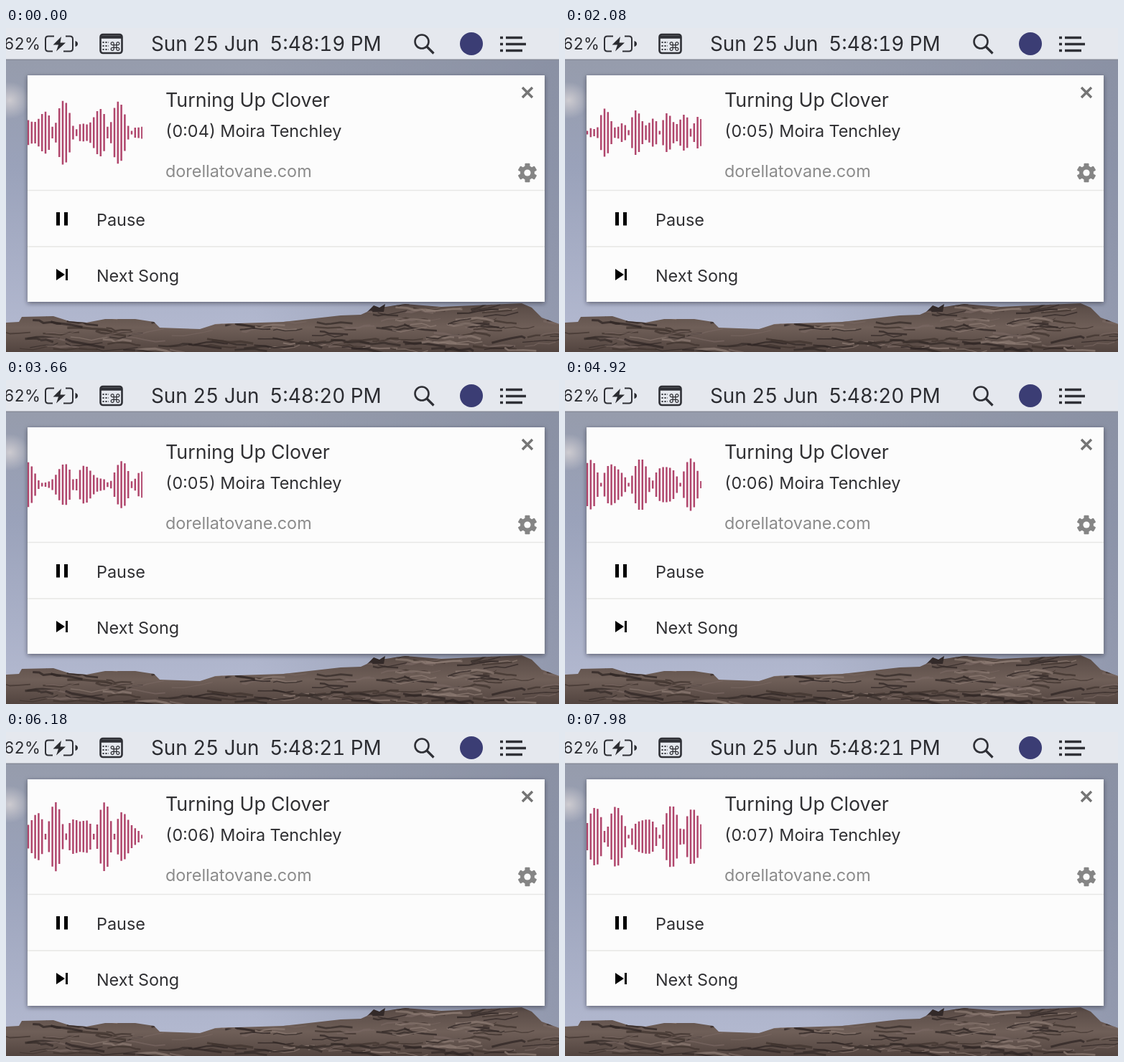
These frames come from a looping animation (770x452 px, 8 s). An HTML page:

```html
<!DOCTYPE html>
<html lang="en">
<head>
<meta charset="utf-8">
<title>Music notification</title>
<style>
  html, body { margin: 0; width: 100%; height: 100%; overflow: hidden; background: #9aa0b4; }
  svg { display: block; width: 770px; height: 452px; }
  text { font-family: Inter, Roboto, sans-serif; white-space: pre; font-variant-numeric: tabular-nums; }
  .menu { fill: #2b2c31; }
  .row { fill: #303033; font-size: 23.4px; }
  .line { fill: none; stroke: #2f3036; }
</style>
</head>
<body>
<svg viewBox="0 0 770 452">
  <defs>
    <linearGradient id="sky" x1="0" y1="44" x2="0" y2="420" gradientUnits="userSpaceOnUse">
      <stop offset="0" stop-color="#969cac"/>
      <stop offset=".4" stop-color="#9aa2ba"/>
      <stop offset="1" stop-color="#b2b8cf"/>
    </linearGradient>
    <linearGradient id="dusk">
      <stop offset=".45" stop-color="#858ca0" stop-opacity="0"/>
      <stop offset="1" stop-color="#858ca0" stop-opacity=".7"/>
    </linearGradient>
    <radialGradient id="glow">
      <stop offset="0" stop-color="#cdcbd0"/>
      <stop offset="1" stop-color="#cdcbd0" stop-opacity="0"/>
    </radialGradient>
    <linearGradient id="rock" x1="0" y1="0" x2="0" y2="1">
      <stop offset="0" stop-color="#584a45"/>
      <stop offset=".5" stop-color="#6f5f58"/>
      <stop offset="1" stop-color="#52443f"/>
    </linearGradient>
    <filter id="shade" x="-5%" y="-5%" width="110%" height="112%">
      <feDropShadow dx="0" dy="2" stdDeviation="3" flood-color="#20222c" flood-opacity=".55"/>
    </filter>
    <clipPath id="cover"><rect x="30" y="66" width="160" height="160"/></clipPath>
    <path id="cliff" d="M0 411L18 410 22 403 66 402 88 409 112 411 138 406 180 406 206 410 214 418 270 420 292 413 386 410 466 401 494 400 514 391 556 385 606 389 718 384 732 390 746 404 770 413V452H0Z"/>
    <clipPath id="stone"><use href="#cliff"/></clipPath>
  </defs>

  <rect y="44" width="770" height="408" fill="url(#sky)"/>
  <rect y="44" width="770" height="408" fill="url(#dusk)"/>
  <ellipse cx="5" cy="101" rx="28" ry="26" fill="url(#glow)"/>
  <use href="#cliff" fill="url(#rock)"/>
  <path d="M503 396L512 387 520 390 528 385 526 396Z" fill="#332a29"/>
  <g id="cracks" clip-path="url(#stone)" fill="none" stroke-linejoin="round"></g>

  <rect width="770" height="44" fill="#e5e8ee"/>
  <rect y="43.5" width="770" height="1.5" fill="#868b98"/>

  <text class="menu" x="-3" y="30" font-size="22.3">62%</text>
  <g class="line" stroke-width="2">
    <path d="M67 11.5H59Q55 11.5 55 15.5V28.5Q55 32.5 59 32.5H65M83 11.5H89Q93 11.5 93 15.5V28.5Q93 32.5 89 32.5H80"/>
    <rect x="131.5" y="9" width="30" height="26" rx="3.5" stroke-width="2.6"/>
    <path d="M131 12.5H162" stroke-width="4.5"/>
    <path d="M134.5 20H143M134.5 25H143M134.5 30H143" stroke-dasharray="2 2"/>
    <circle cx="579" cy="19" r="9.5" stroke-width="2.6"/>
    <path d="M586 26L595.5 35.5" stroke-width="3.2"/>
    <path d="M688 13.5H692M696 13.5H719M688 22.5H692M696 22.5H724M688 31.5H692M696 31.5H719" stroke-width="3.6"/>
  </g>
  <path class="menu" d="M77 12L65.500 23.500H73L70 32.500 83 20.500H75.500ZM96.500 18Q100 19 100 22T96.500 26Z"/>
  <text class="menu" x="143.500" y="32" font-size="17" style="font-family:'DejaVu Sans',sans-serif">⌘</text>
  <text class="menu" id="clock" x="202" y="32" font-size="27.800"></text>
  <circle cx="648" cy="22" r="16" fill="#3b3d74"/>

  <rect x="30" y="66" width="720" height="316" fill="#fcfcfc" filter="url(#shade)"/>
  <path d="M30 226.500H750M30 305H750" stroke="#e7e7e5" stroke-width="1.500"/>
  <path id="wave" clip-path="url(#cover)" fill="none" stroke="#b0466c" stroke-width="2.500"/>

  <text x="222" y="110" font-size="26.800" fill="#303033">Turning Up Clover</text>
  <text class="row" id="song" x="222" y="152"></text>
  <text class="row" x="222" y="208" style="fill:#8b8b8b">dorellatovane.com</text>
  <text class="row" x="126" y="276">Pause</text>
  <text class="row" x="126" y="354">Next Song</text>

  <path d="M719 83L733 97M733 83L719 97" stroke="#747474" stroke-width="3.400"/>
  <g id="gear" transform="translate(726 202)" fill="#858585">
    <circle r="10"/>
    <circle r="4.600" fill="#fcfcfc"/>
  </g>
  <path d="M70 257H75V275.500H70ZM81 257H86V275.500H81ZM70 336L82 344 70 352ZM83 336H86V352H83Z"/>
</svg>
<script>
const LOOP = 8000, TICK = 140, SECOND = 2800, BARS = 34;
const $ = id => document.getElementById(id);

function random(seed) {
  const v = Math.sin(seed * 127.1 + 11.7) * 43758.5453;
  return v - Math.floor(v);
}

// Two rectified sine waves with seeded loudness, pitch and phase
function level(tick, bar) {
  const r = k => random(tick * 7 + k);
  const low = (20 + 16 * r(1)) * Math.sin(bar * (0.3 + 0.16 * r(2)) + 6.28 * r(3));
  const high = (6 + 9 * r(4)) * Math.sin(bar * (0.7 + 0.4 * r(5)) + 6.28 * r(6));
  return Math.max(2.5, Math.abs(low + high));
}

function wavePath(tick) {
  let d = '';
  for (let i = 0; i < BARS; i++) {
    const h = level(tick, i);
    d += `M${(31 + 4.8 * i).toFixed(1)} ${(146 - h).toFixed(1)}v${(2 * h).toFixed(1)}`;
  }
  return d;
}

// Jagged, mostly level seams in dark and light stone
function buildRock() {
  const tones = ['#2f2625', '#40342f', '#8b7a72', '#352b29', '#776660'];
  let seams = '';
  for (let i = 0; i < 170; i++) {
    const r = k => random(i * 9 + k + 500);
    let d = `M${(780 * r(0) - 10).toFixed(1)} ${(386 + 64 * r(1)).toFixed(1)}`;
    for (let k = 2; k < 6; k++)
      d += `l${(5 + 13 * r(k)).toFixed(1)} ${(7 * r(k + 3) - 3.5).toFixed(1)}`;
    seams += `<path d="${d}" stroke="${tones[i % tones.length]}" stroke-width="${(1 + 2.4 * r(8)).toFixed(1)}" opacity=".75"/>`;
  }
  $('cracks').innerHTML = seams;
}

function buildGear() {
  let teeth = '';
  for (let a = 0; a < 360; a += 60)
    teeth += `<rect x="-3.5" y="-13.3" width="7" height="6" rx="1" transform="rotate(${a})"/>`;
  $('gear').insertAdjacentHTML('afterbegin', teeth);
}

const elapsed = (t, first) => Math.max(0, 1 + Math.floor((t - first) / SECOND));

function render(t) {
  $('wave').setAttribute('d', wavePath(Math.floor(t / TICK)));
  $('clock').textContent = `Sun 25 Jun  5:48:${19 + elapsed(t, 2640)} PM`;
  $('song').textContent = `(0:0${4 + elapsed(t, 1680)}) Moira Tenchley`;
}

buildRock();
buildGear();
render(0);
const start = performance.now();
function frame() {
  render((performance.now() - start) % LOOP);
  requestAnimationFrame(frame);
}
requestAnimationFrame(frame);
</script>
</body>
</html>
```
